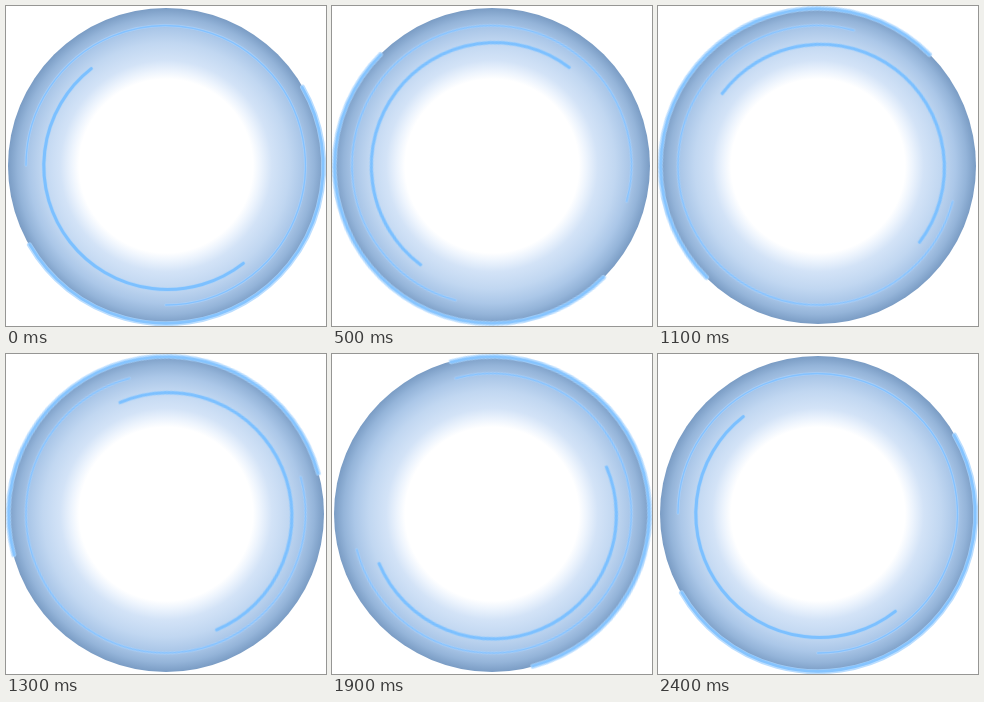
An HTML page for the animation above (2500 ms loop, 320 px wide and 320 px high).

```html
<!DOCTYPE html>
<html lang="en">
<head>
<meta charset="utf-8">
<title>Spinning rings</title>
<style>
  html, body { margin: 0; width: 100%; height: 100%; overflow: hidden; background: #fff; }
  svg { display: block; width: 100vw; height: 100vh; }
  path { fill: none; stroke-linecap: round; }
</style>
</head>
<body>
<svg viewBox="0 0 320 320">
  <defs>
    <radialGradient id="shade" gradientUnits="userSpaceOnUse" cx="160" cy="160" r="158">
      <stop offset=".55" stop-color="#fff"/>
      <stop offset=".6" stop-color="#edf4fd"/>
      <stop offset=".67" stop-color="#d3e3f7"/>
      <stop offset=".78" stop-color="#c1d7f1"/>
      <stop offset=".87" stop-color="#abc7e8"/>
      <stop offset=".94" stop-color="#94b4d9"/>
      <stop offset="1" stop-color="#7a9cc4"/>
    </radialGradient>
  </defs>
  <circle cx="160" cy="160" r="158" fill="url(#shade)"/>
</svg>
<script>
  const svg = document.querySelector('svg');

  // Each stroke is [width, colour, opacity, radius shift], widest first.
  const rings = [
    { pivot: [160, 160], center: [160, 160], r: 157.3, start: -30, span: 180, turn: 360,
      strokes: [[5, '#a9d5ff', 0.8, 0.4], [2.6, '#85c4ff', 1, 0]] },
    { pivot: [159.7, 159.3], center: [159.7, 159.3], r: 139.7, start: 180, span: 270, turn: -360,
      strokes: [[3, '#a9d3ff', 0.65, 0], [1.3, '#84c2ff', 1, 0]] },
    { pivot: [162, 161], center: [161.3, 160], r: 123.5, start: 52, span: 180, turn: 360,
      strokes: [[4.2, '#9ccfff', 0.5, 0], [3, '#7cc0ff', 1, 0]] }
  ];

  function make(parent, tag, attrs) {
    const node = document.createElementNS('http://www.w3.org/2000/svg', tag);
    for (const key in attrs) node.setAttribute(key, attrs[key]);
    return parent.appendChild(node);
  }

  function arc([cx, cy], r, start, span) {
    const point = deg => {
      const a = deg * Math.PI / 180;
      return `${cx + r * Math.cos(a)} ${cy + r * Math.sin(a)}`;
    };
    const mid = start + span / 2;
    return `M${point(start)}A${r} ${r} 0 0 1 ${point(mid)}A${r} ${r} 0 0 1 ${point(start + span)}`;
  }

  for (const { pivot, center, r, start, span, turn, strokes } of rings) {
    const group = make(svg, 'g', {});
    group.style.transformOrigin = `${pivot[0]}px ${pivot[1]}px`;
    for (const [width, color, opacity, shift] of strokes) {
      make(group, 'path', {
        d: arc(center, r + shift, start, span),
        stroke: color, 'stroke-width': width, 'stroke-opacity': opacity
      });
    }
    // 24 steps of 15 degrees, then the closing pose rests for one more step.
    group.animate([
      { transform: 'rotate(0deg)', offset: 0, easing: 'steps(24, end)' },
      { transform: `rotate(${turn}deg)`, offset: 0.96 },
      { transform: `rotate(${turn}deg)`, offset: 1 }
    ], { duration: 2500, iterations: Infinity });
  }
</script>
</body>
</html>
```
